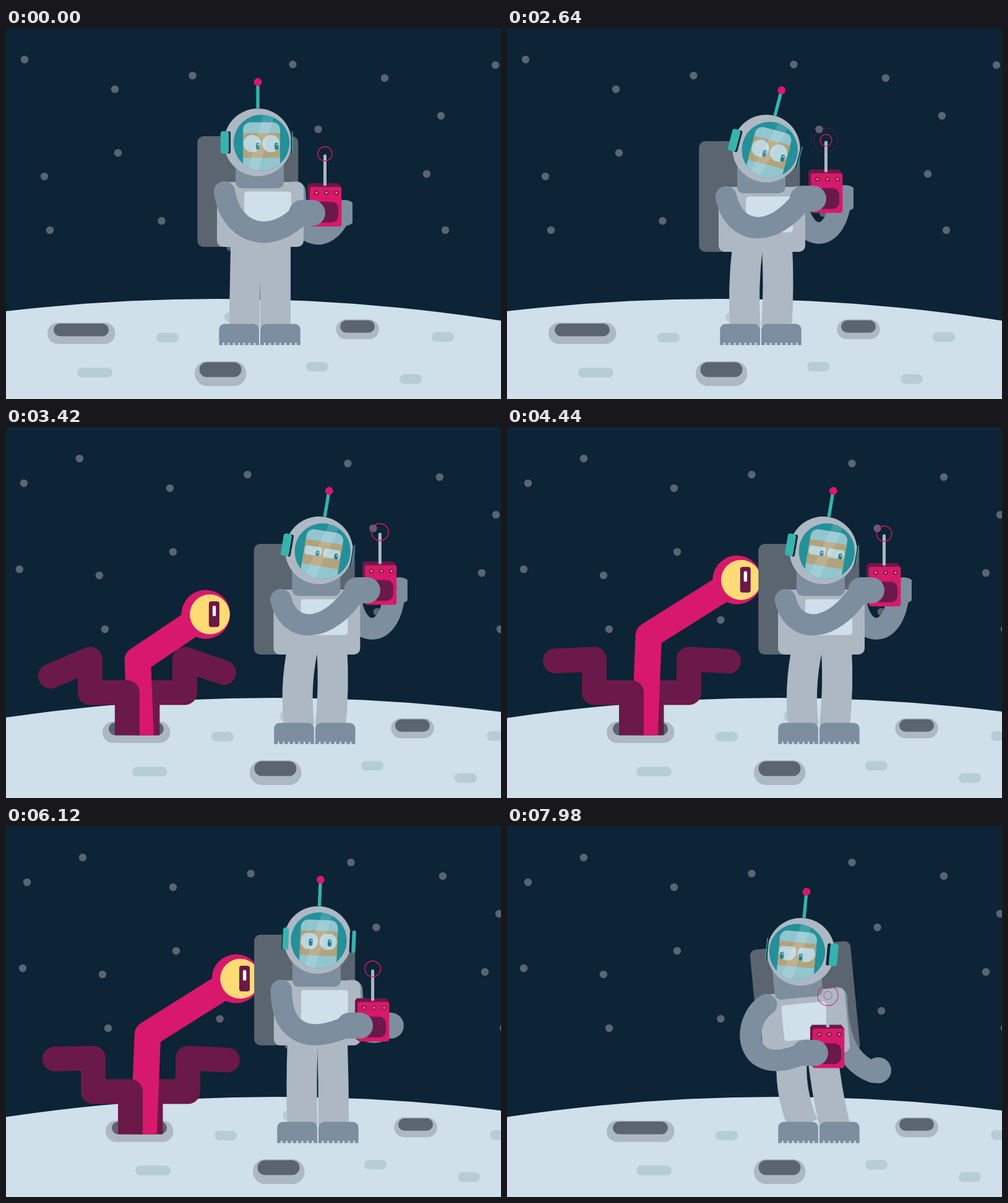
Write an HTML page with a canvas that moves like this. It is 800 px wide and 600 px high and loops after 8 s.

```html
<!DOCTYPE html>
<html lang="en">
<head>
<meta charset="utf-8">
<title>Moon walk</title>
<style>
  html, body { margin: 0; width: 100%; height: 100%; overflow: hidden; background: #0c2435; }
  canvas { display: block; width: 800px; height: 600px; }
</style>
</head>
<body>
<canvas id="stage" width="800" height="600"></canvas>
<script>
const LOOP = 8000;
const ctx = document.getElementById('stage').getContext('2d');
const C = {
  sky: '#0c2435', star: '#5a6570', moon: '#cfe0ea', patch: '#b5cdd4',
  suit: '#adb8c3', limb: '#7d8e9e', dark: '#5a6570', pink: '#d8186c', plum: '#6b1948',
  teal: '#35b4ae', visor: '#23909a', hair: '#92c6cf', skin: '#b1a37b',
  eye: '#bad6de', pupil: '#237f8d', yellow: '#ffdb76', lamp: '#dd8a3c'
};
const STARS = [[30,51],[176,99],[301.5,77],[463.5,59],[612,81],[791,60],[703,142],[504.5,164],
  [181,202],[62,240],[71,327],[251.5,312],[680,236],[710,327],[511,299],[362.5,354.5],[-60,91],[-67,230]];
const PATCHES = [[243,493,36],[115,549.5,57],[485,540,36],[688,492,36],[636,560,36],[353,460,36]];

// ---------- maths ----------
const lerp = (a, b, k) => a + (b - a) * k;
const mix = (a, b, k) => a.map((v, i) => lerp(v, b[i], k));
const span = (t, a, b) => Math.min(1, Math.max(0, (t - a) / (b - a)));
const quad = k => k < .5 ? 2 * k * k : 1 - 2 * (1 - k) ** 2;
const cubic = k => k < .5 ? 4 * k ** 3 : 1 - 4 * (1 - k) ** 3;

function trim(points, k) {
  const dist = (a, b) => Math.hypot(b[0] - a[0], b[1] - a[1]);
  let left = 0;
  for (let i = 1; i < points.length; i++) left += dist(points[i - 1], points[i]);
  left *= k;
  const out = [points[0]];
  for (let i = 1; i < points.length; i++) {
    const d = dist(points[i - 1], points[i]);
    out.push(mix(points[i - 1], points[i], Math.min(1, left / d)));
    left -= d;
    if (left <= 0) break;
  }
  return out;
}

// ---------- drawing helpers ----------
function box(x, y, w, h, r, color) {
  ctx.fillStyle = color;
  ctx.beginPath();
  ctx.roundRect(x, y, w, h, r);
  ctx.fill();
}
function disc(x, y, r, color) {
  ctx.fillStyle = color;
  ctx.beginPath();
  ctx.arc(x, y, r, 0, 7);
  ctx.fill();
}
function stroke(width, color, cap = 'round') {
  ctx.lineWidth = width;
  ctx.strokeStyle = color;
  ctx.lineCap = cap;
  ctx.lineJoin = 'round';
  ctx.stroke();
}
function line(points, width, color, cap) {
  ctx.beginPath();
  points.forEach(p => ctx.lineTo(...p));
  stroke(width, color, cap);
}
function curve(a, b, c, d, width, color) {
  ctx.beginPath();
  ctx.moveTo(...a);
  ctx.bezierCurveTo(...b, ...c, ...d);
  stroke(width, color);
}
function group(draw) {
  ctx.save();
  draw();
  ctx.restore();
}
function clipBox(x, y, w, h) {
  ctx.beginPath();
  ctx.rect(x, y, w, h);
  ctx.clip();
}

// ---------- poses ----------
// body/head: x, y, degrees; arm/far: two control points; lids: top, bottom
const curious = {
  body: [341, 249, 0], head: [407, 185, 0], turn: [1], twist: [0], bend: [0, 0],
  hand: [495, 299], radio: [-42], arm: [364, 335, 430, 352],
  far: [468, 345, 520, 350], farHand: [547, 299], look: [9, 4], lids: [-15, 15]
};
const tilted = { ...curious,
  body: [344.3, 250.5, 0], head: [424, 190.5, 20], hand: [495, 287], radio: [-41],
  arm: [366, 337, 430, 347], far: [472, 345, 525, 353], farHand: [547, 287], look: [8.8, 5.3]
};
const raising = { ...tilted,
  body: [342, 257, 0], head: [419, 195, 14.7], bend: [-6, 4], hand: [495, 276],
  arm: [368, 336, 430, 342], far: [472, 345, 530, 355], farHand: [547, 275], look: [8.3, 6.1]
};
const bored = { ...raising,
  body: [343.5, 263, 0], head: [417, 199.5, 9.6], bend: [-10, 5], hand: [495, 264], radio: [-40.5],
  arm: [368, 334, 430, 338], far: [473, 338, 532, 350], farHand: [547, 264], look: [7.7, 3.8], lids: [-7, 7.5]
};
const waiting = { ...bored, body: [344, 263, 0], radio: [-38] };
const facing = { ...waiting,
  body: [337, 245, 0], head: [407.5, 180.5, 0], turn: [0], bend: [0, 0], hand: [472, 344], radio: [-38.5],
  arm: [345, 330, 375, 362], far: [464, 320, 480, 345], farHand: [521, 344], look: [.5, 1], lids: [-15, 15]
};
const turned = { ...facing,
  body: [311.7, 274, -5.5], head: [381, 203.5, 5.3], turn: [-1], twist: [1], bend: [-16, -4],
  hand: [404, 367], radio: [-39.5], arm: [282, 318, 288, 412],
  far: [440, 350, 462, 385], farHand: [506, 395], look: [-8.9, 6.3], lids: [-9, 15]
};
const KEYS = [
  [0, curious],
  [820, { ...tilted, hand: [495, 292], farHand: [547, 292] }],
  [1380, tilted], [2640, raising], [3420, bored], [4300, waiting], [5720, waiting],
  [6350, { ...facing, head: [407.5, 179, 0] }],
  [6990, facing], [7420, turned], [LOOP, turned]
];
function poseAt(t) {
  const i = KEYS.findIndex((key, n) => n && t <= key[0]);
  const [t0, a] = KEYS[i - 1], [t1, b] = KEYS[i];
  const k = quad(span(t, t0, t1)), pose = {};
  for (const name in a) pose[name] = mix(a[name], b[name], k);
  return pose;
}

// ---------- scene ----------
function crater(x, y, w, h, r, inset, innerW, innerH) {
  box(x, y, w, h, r, C.suit);
  box(x + inset, y + 1.5, innerW, innerH, innerH / 2, C.dark);
}
function ground() {
  STARS.forEach(([x, y]) => disc(x, y, 6.2, C.star));
  disc(344, 3396, 2958, C.moon);
  PATCHES.forEach(([x, y, w]) => box(x, y, w, 15.5, 8, C.patch));
  crater(67, 476.5, 109.5, 34.5, 17, 10, 89, 20.5);
  crater(305, 539, 83.5, 40, 20, 7.5, 68, 24);
  crater(533.3, 471.3, 69.5, 32, 16, 6.7, 56, 20);
}

function alien(t) {
  const out = quad(span(t, 2780, 3400)) * (1 - quad(span(t, 7000, 7560)));
  if (!out) return;
  const grow = quad(span(t, 3420, 4500)), sway = quad(span(t, 5550, 6990));
  const leftTip = mix(mix([-17, 403], [-16, 378], grow), [-14, 374], sway);
  const left = [[107, 540], [107, 429.5], [lerp(47, 47, grow), 429.5], [47, 375.5], leftTip];
  const right = [[139.5, 540], [139.5, 429.5], [200, 429.5], [200, 375.5], mix([263, 397], [264, 378.5], grow)];
  const neck = trim([[127, 560], [128.5, 498], mix([124, 377], [135, 337], grow), mix([234, 303], [278, 247], grow)], out);
  const [x, y] = neck[neck.length - 1];
  group(() => {
    clipBox(-200, 0, 1000, 498.5);
    line(trim(right, out), 40, C.plum);
    line(neck, 42.5, C.pink);
    line(trim(left, out), 40, C.plum);
    disc(x, y, 39.5, C.pink);
    disc(x + 6.5, y, 32.3, C.yellow);
    box(x + 5, y - 21, 17, 41.5, 4, C.plum);
    box(x + 11, y - 14, 5.3, 17, 2, '#fff');
  });
}

function foot(x) {
  box(x, 478.5, 64.7, 30.5, [9, 9, 0, 0], C.limb);
  for (let i = 0; i < 8; i++) box(x + i * 8.4, 508, 5.8, 4.8, 0, C.limb);
}

function ear(side, turn) {
  const s = side * turn;
  // values for: turned away, facing front, turned towards the viewer
  const pick = ([hidden, front, shown]) => s > 0 ? lerp(front, hidden, s) : lerp(front, shown, -s);
  const bar = (x, w, color) => {
    const width = pick(w), left = pick(x);
    box(side > 0 ? left : -left - width, -18, width, 36, Math.min(4, width / 2), color);
  };
  bar(side > 0 ? [53.5, 50.5, 42] : [53.5, 55, 44], [2.5, 6, 6], C.sky);
  bar(side > 0 ? [55, 55, 46.5] : [55, 47.5, 47], [1.3, 8, 13.3], C.teal);
}

function helmet({ head: [x, y, deg], turn: [turn], look, lids }) {
  ctx.translate(x, y);
  ctx.rotate(deg * Math.PI / 180);
  line([[0, -55], [0, -93]], 5.3, C.teal, 'butt');
  disc(0, -97.5, 6.4, C.pink);
  disc(0, 0, 54.7, C.suit);
  ear(-1, turn);
  ear(1, turn);
  ctx.translate(6 * turn, .5);
  disc(0, 0, 45.2, C.visor);
  ctx.clip();
  box(-30, -33, 60, 90, 12, C.hair);
  box(-30, -15.5, 60, 40, 0, C.skin);
  for (const ex of [-15.2, 15.2]) group(() => {
    ctx.translate(ex, 1.5);
    clipBox(-15, lids[0], 30, lids[1] - lids[0]);
    disc(0, 0, 14, C.eye);
    box(look[0] - 3, look[1] - 5.5, 6, 11.5, 3, C.pupil);
    disc(look[0] + .8, look[1] - 2.4, 1.3, C.eye);
  });
  ctx.fillStyle = 'rgba(255,255,255,.14)';
  ctx.beginPath();
  [[3, -46], [20, -43], [-5, 46], [-22, 43]].forEach(p => ctx.lineTo(...p));
  ctx.fill();
}

function radio(x, y, t) {
  ctx.translate(x, y);
  ctx.fillStyle = C.plum;
  ctx.beginPath();
  [[-4, -2], [-1, -6], [46, -6], [51, 0], [45, 58], [0, 62], [-4, 58]].forEach(p => ctx.lineTo(...p));
  ctx.fill();
  line([[24.5, -4], [24.5, -50]], 5, C.suit);
  box(0, 0, 51.3, 64, 4, C.pink);
  box(8, 24, 38, 33.5, 11, C.plum);
  for (const lx of [10.8, 26.9, 43]) {
    disc(lx, 9.5, 3.6, C.plum);
    disc(lx, 9.5, 2, C.lamp);
  }
  const phase = (t / 550 + .15) % 1;
  for (const r of [phase * 10, phase * 10 + 10]) {
    ctx.globalAlpha = Math.max(0, Math.min(1, (r - 4) / 6, (21 - r) / 6));
    ctx.beginPath();
    ctx.arc(24.5, -53.5, r, 0, 7);
    stroke(1.4, C.pink);
  }
}

function astronaut(t) {
  const p = poseAt(t);
  const [bx, by, deg] = p.body, [twist] = p.twist;
  const a = deg * Math.PI / 180, cos = Math.cos(a), sin = Math.sin(a);
  const onBody = (x, y) => [bx + x * cos - y * sin, by + x * sin + y * cos];
  const inBody = draw => group(() => {
    ctx.translate(bx, by);
    ctx.rotate(a);
    draw();
  });

  inBody(() => box(-31.7 + 25 * twist, -74, 163, 179, 10, C.dark));

  group(() => {
    clipBox(0, 0, 560, 600);
    const [fx, fy] = p.farHand;
    curve(onBody(126, 16), p.far.slice(0, 2), p.far.slice(2), [fx - 8, fy + 3], 35, C.limb);
    disc(fx, fy, 21, C.limb);
  });

  [[46.7, 385], [94.5, 435.5]].forEach(([hip, ankle], i) => {
    const [hx, hy] = onBody(hip, 97);
    ctx.beginPath();
    ctx.moveTo(hx, hy);
    ctx.quadraticCurveTo((hx + ankle) / 2 + p.bend[i], (hy + 484) / 2, ankle, 484);
    stroke(49, C.suit, 'butt');
  });
  foot(344.3);
  foot(411);

  inBody(() => {
    box(0, 0, 140, 105, 10, C.suit);
    box(44 - 8.5 * twist, 15.5 + 4.5 * twist, 76 - 3 * twist, 58, 5, C.moon);
    box(30 - 3 * twist, -45, 78, 55.3, 10, C.limb);
  });
  group(() => helmet(p));

  const [hx, hy] = p.hand;
  group(() => radio(hx - 4, hy + p.radio[0], t));
  curve(onBody(12, 16), p.arm.slice(0, 2), p.arm.slice(2), [hx - 17, hy], 34.5, C.limb);
  line([[hx - 17, hy], [hx, hy]], 42, C.limb);
}

function frame(now) {
  const t = now % LOOP;
  ctx.fillStyle = C.sky;
  ctx.fillRect(0, 0, 800, 600);
  group(() => {
    ctx.translate(94 * cubic(span(t, 2660, 3660)), 0);
    ground();
    alien(t);
    astronaut(t);
  });
}

const start = performance.now();
function tick() {
  frame(performance.now() - start);
  requestAnimationFrame(tick);
}
tick();
</script>
</body>
</html>
```
